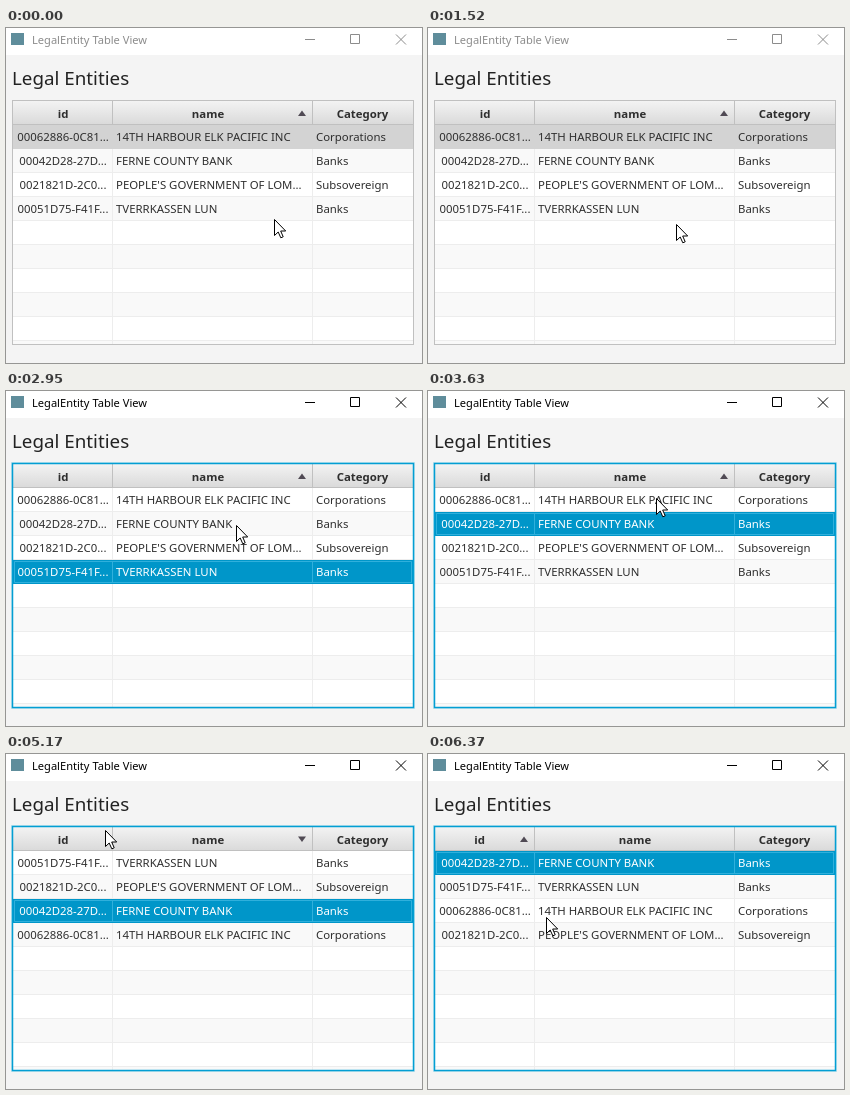
Animation of 416 by 335 pixels, one loop 8230 ms. Source, as an HTML page:

```html
<!DOCTYPE html>
<html lang="en">
<head>
<meta charset="utf-8">
<title>LegalEntity Table View</title>
<style>
  html, body { margin: 0; width: 100%; height: 100%; overflow: hidden; background: #f4f4f4; }
  svg { display: block; font: 11.4px "Noto Sans", "Open Sans", sans-serif; fill: #2e2e2e; }
  .head { font-weight: bold; }
  .head, .id { text-anchor: middle; }
  .chosen { fill: #fff; }
  #chrome { fill: #8c8c8c; stroke: #8c8c8c; }
  #border { stroke: #c0c0c0; }
  #fill { fill: #d3d3d3; }
  #ring, #glow { visibility: hidden; }
  .active #chrome { fill: #000; stroke: #000; }
  .active #border { stroke: #039ed3; stroke-width: 1.5; }
  .active #fill { fill: #0096c9; }
  .active #ring, .active #glow { visibility: visible; }
</style>
</head>
<body>
<svg id="stage" width="416" height="335" viewBox="0 0 416 335">
  <defs>
    <linearGradient id="shade" x2="0" y2="1">
      <stop stop-color="#f3f3f3"/><stop offset="1" stop-color="#d9d9d9"/>
    </linearGradient>
  </defs>
  <rect width="416" height="335" fill="#f4f4f4"/>
  <rect width="416" height="27" fill="#fff"/>
  <rect x="5" y="5" width="13" height="12" fill="#5f8d9b"/>
  <g id="chrome">
    <text x="26" y="16" font-size="11.1" stroke="none">LegalEntity Table View</text>
    <path d="M299 11.5h10M344.5 6.5h9v9h-9zM390 6.5l10 10M400 6.5l-10 10" fill="none"/>
  </g>
  <text x="6" y="56.5" font-size="18.8" fill="#222">Legal Entities</text>

  <rect x="7" y="73" width="400" height="243" fill="#fff"/>
  <g id="stripes"></g>
  <path d="M106.5 97V316M306.5 97V316" stroke="#ededed"/>
  <rect x="7" y="73" width="400" height="24" fill="url(#shade)"/>
  <path d="M7 96.5H407M106.5 73V96M306.5 73V96" stroke="#c0c0c0"/>
  <g class="head">
    <text id="idHead" y="90">id</text>
    <text id="nameHead" y="90">name</text>
    <text x="356.5" y="90">Category</text>
  </g>
  <path id="arrow" d="M-4 2.8H4L0 -2.8Z" fill="#504a54"/>

  <g id="bar">
    <rect id="fill" x="7" width="400" height="24"/>
    <path id="ring" d="M8.5 1.5H405.5V22.5H8.5zM106.5 2V22M306.5 2V22" fill="none" stroke="#30b0dc"/>
  </g>
  <g id="rows"></g>

  <rect id="border" x="6.5" y="72.5" width="401" height="244" fill="none"/>
  <rect id="glow" x="5.5" y="71.5" width="403" height="246" fill="none" stroke="#039ed3" stroke-opacity=".2"/>
  <g id="pointer">
    <path d="M.5 .5V16.5L4.2 13L6.8 18.8L9.2 17.8L6.7 12H11.7Z" fill="#fff" stroke="#000"/>
    <circle id="click" r="12" fill="#ff0" fill-opacity=".5"/>
  </g>
</svg>
<script>
const LOOP = 8230, STEP = 110, TOP = 97, ROW = 24;
const $ = id => document.getElementById(id);
const set = (el, attrs) => {
  for (const key in attrs) el.setAttribute(key, attrs[key]);
  return el;
};
const add = (parent, tag, attrs, text = "") => {
  const el = document.createElementNS("http://www.w3.org/2000/svg", tag);
  el.textContent = text;
  return parent.appendChild(set(el, attrs));
};

const entities = [
  { id: "00062886-0C81...", name: "14TH HARBOUR ELK PACIFIC INC", category: "Corporations" },
  { id: "00042D28-27D...", name: "FERNE COUNTY BANK", category: "Banks" },
  { id: "0021821D-2C0...", name: "PEOPLE'S GOVERNMENT OF LOM...", category: "Subsovereign" },
  { id: "00051D75-F41F...", name: "TVERRKASSEN LUN", category: "Banks" }
];

// A row reacts to the press, a column header to the release one step later
const clicks = [
  { at: 2070, choose: 3 },
  { at: 3170, choose: 1 },
  { at: 4070, sort: "name" },
  { at: 5370, sort: "id" }
];

// Pointer moves: each runs from the last tip along a curve pulled by bend
const moves = [
  { start: 740, end: 1520, bend: [262, 249], to: [248, 196] },
  { start: 1630, end: 2390, bend: [244, 185], to: [240, 174] },
  { start: 2510, end: 2950, bend: [235, 154], to: [230, 134] },
  { start: 3170, end: 3950, bend: [244, 111], to: [203, 86] },
  { start: 4070, end: 4380, bend: [197, 85], to: [195, 87] },
  { start: 4600, end: 5370, bend: [128, 59], to: [61, 87] },
  { start: 5710, end: 6370, bend: [90, 125], to: [118, 163] }
];

for (let y = TOP, i = 0; y < 316; y += ROW, i++) {
  const height = Math.min(ROW, 316 - y);
  add($("stripes"), "rect", { x: 7, y, width: 400, height, fill: i % 2 ? "#f9f9f9" : "#fff" });
  if (height === ROW) add($("stripes"), "path", { d: `M7 ${y + 23.5}H407`, stroke: "#ededed" });
}
const rows = entities.map(({ id, name, category }) => {
  const row = add($("rows"), "g", {});
  add(row, "text", { x: 57, y: 16, class: "id" }, id);
  add(row, "text", { x: 110, y: 16 }, name);
  add(row, "text", { x: 310, y: 16 }, category);
  return row;
});

function tipAt(t) {
  let tip = [268, 191];
  for (const { start, end, bend, to } of moves) {
    if (t < start) break;
    const steps = Math.round((end - start) / STEP);
    const k = Math.min(1, Math.floor((t - start) / (end - start) * steps + 1e-6) / steps);
    tip = tip.map((from, i) =>
      Math.round((1 - k) ** 2 * from + 2 * k * (1 - k) * bend[i] + k * k * to[i]));
  }
  return tip;
}

function tableAt(t) {
  const table = { chosen: 0, sort: "name", up: true };
  for (const { at, choose, sort } of clicks) {
    if (choose !== undefined && t >= at) table.chosen = choose;
    if (sort && t >= at + STEP) {
      table.up = sort !== table.sort || !table.up;
      table.sort = sort;
    }
  }
  return table;
}

function draw(t) {
  const { chosen, sort, up } = tableAt(t);
  const active = t >= clicks[0].at;
  const byId = sort === "id";
  const sign = up ? 1 : -1;
  const order = [...entities].sort((a, b) => a[sort] < b[sort] ? -sign : sign);
  const place = i => `translate(0 ${TOP + order.indexOf(entities[i]) * ROW})`;

  rows.forEach((row, i) => set(row, {
    transform: place(i),
    class: active && i === chosen ? "chosen" : ""
  }));
  set($("bar"), { transform: place(chosen) });
  set($("stage"), { class: active ? "active" : "" });

  set($("idHead"), { x: byId ? 51.5 : 57 });
  set($("nameHead"), { x: byId ? 207 : 202 });
  set($("arrow"), { transform: `translate(${byId ? 96 : 296} 85.2) scale(1 ${sign})` });

  set($("pointer"), { transform: `translate(${tipAt(t)})` });
  const pressed = clicks.some(({ at }) => t >= at && t < at + STEP);
  set($("click"), { visibility: pressed ? "visible" : "hidden" });
}

const begin = performance.now();
function tick() {
  draw((performance.now() - begin) % LOOP);
  requestAnimationFrame(tick);
}
tick();
</script>
</body>
</html>
```
